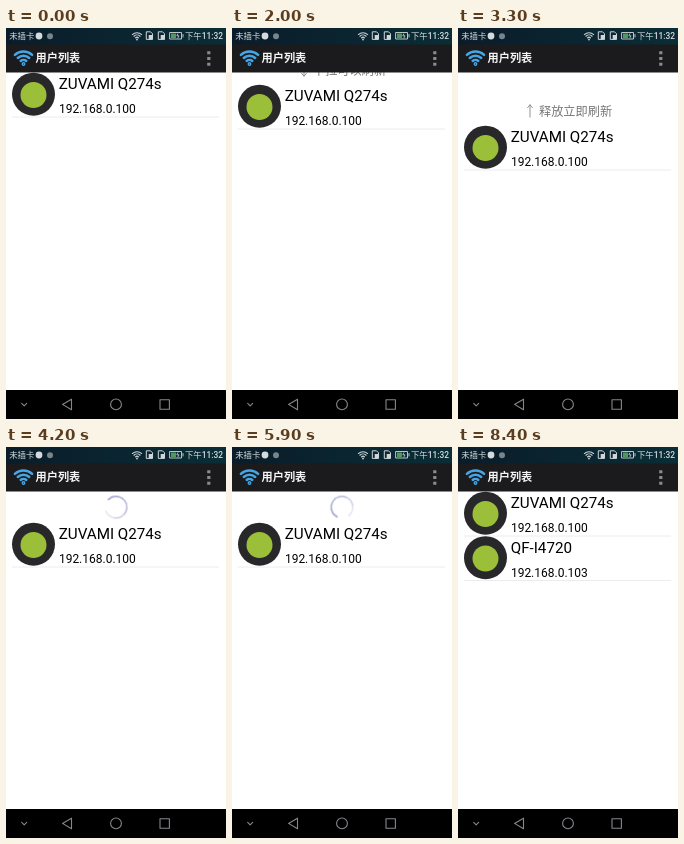
An HTML page for the animation above (9700 ms loop, 220 px wide and 391 px high).

```html
<!DOCTYPE html>
<html lang="zh-CN">
<head>
<meta charset="utf-8">
<title>用户列表</title>
<style>
html, body { margin: 0; width: 100%; height: 100%; overflow: hidden; background: #fff; }
svg { display: block; width: 100vw; height: 100vh; }
text { font-family: Roboto, "Noto Sans CJK SC", "Noto Sans CJK", sans-serif; }
.name { font-size: 15.2px; }
.ip { font-size: 12px; }
.hint { font-size: 12.2px; fill: #777; }
.status { font-size: 8.4px; font-weight: 500; fill: #d5dde0; }
.title { font-size: 11.2px; font-weight: 700; fill: #f4f4f4; }
.line { fill: none; stroke-linecap: round; stroke-linejoin: round; }

/* One loop is 9.7 s, so 100 ms is about 1.031 % */
.list, .hints, .pull, .release, .arrow, .spinner, .second { animation: 9.7s step-end infinite; }
.list { animation-name: drag; }
.hints { animation-name: hints; }
.pull { animation-name: pull; }
.release { animation-name: release; }
.arrow { animation-name: flip; transform-origin: 72px 30px; }
.spinner { animation-name: busy; }
.second { animation-name: found; }
.ring { transform-origin: 110px 29.2px; animation: spin 1s steps(10) infinite; }

@keyframes drag {
  0% { transform: translateY(0); }
  16.49% { transform: translateY(0); animation-timing-function: steps(9); }
  25.77% { transform: translateY(27px); animation-timing-function: steps(8); }
  34.02% { transform: translateY(53px); }
  39.17% { transform: translateY(47px); }
  41.23% { transform: translateY(33px); }
  42.26% { transform: translateY(31px); }
  61.85% { transform: translateY(18px); }
  62.88% { transform: translateY(6px); }
  63.91%, 100% { transform: translateY(0); }
}
@keyframes hints {
  0% { opacity: 1; }
  39.17% { opacity: 0; }
  61.85%, 100% { opacity: 1; }
}
@keyframes pull {
  0% { opacity: 1; }
  26.8% { opacity: 0; }
  61.85%, 100% { opacity: 1; }
}
@keyframes release {
  0% { opacity: 0; }
  26.8% { opacity: 1; }
  61.85%, 100% { opacity: 0; }
}
@keyframes flip {
  0% { transform: rotate(0); }
  26.8% { transform: rotate(-90deg); }
  27.83% { transform: rotate(-180deg); }
  61.85%, 100% { transform: rotate(0); }
}
@keyframes busy {
  0% { opacity: 0; }
  39.17% { opacity: 1; }
  61.85%, 100% { opacity: 0; }
}
@keyframes found {
  0% { opacity: 0; }
  61.85%, 100% { opacity: 1; }
}
@keyframes spin { to { transform: rotate(360deg); } }
</style>
</head>
<body>
<svg viewBox="0 0 220 391">
  <defs>
    <linearGradient id="sky">
      <stop offset="0" stop-color="#0a1c2a"/>
      <stop offset="1" stop-color="#0a2d36"/>
    </linearGradient>
    <g id="avatar">
      <circle cx="27.5" cy="66.2" r="21.5" fill="#28282a"/>
      <circle cx="27.5" cy="67" r="13" fill="#9cbf3a"/>
    </g>
    <path id="divider" d="M6 89H213" stroke="#e6e8ea" stroke-width=".8"/>
    <g id="wifi" class="line">
      <path d="M-8.6-9.2A12.6 12.6 0 0 1 8.6-9.2M-5.7-6A8.3 8.3 0 0 1 5.7-6M-2.8-3A4.1 4.1 0 0 1 2.8-3"/>
      <circle r=".7"/>
    </g>
    <g id="sim">
      <path class="line" d="M-2.8-4H1L3-2V3.6H-2.8Z" stroke="#cfd6da" stroke-width="1"/>
      <path d="M-.8-.8H3V3.6H-.8Z" fill="#cfd6da"/>
    </g>
    <circle id="arc" cx="110" cy="29.2" r="10.8" pathLength="360" transform="rotate(150 110 29.2)"/>
  </defs>

  <rect width="220" height="391" fill="#fff"/>

  <g class="list">
    <g class="hints">
      <path class="line arrow" d="M72 23.8V36.2M69.6 33.4L72 36.2L74.4 33.4" stroke="#888" stroke-width=".9"/>
      <text class="hint pull" x="81" y="34.5">下拉可以刷新</text>
      <text class="hint release" x="81" y="34.5">释放立即刷新</text>
    </g>
    <g class="spinner">
      <g class="ring" fill="none" stroke="#8587bd" stroke-width="1.5" stroke-opacity=".22">
        <use href="#arc" stroke-dasharray="60 300"/>
        <use href="#arc" stroke-dasharray="120 240"/>
        <use href="#arc" stroke-dasharray="180 180"/>
        <use href="#arc" stroke-dasharray="240 120"/>
        <use href="#arc" stroke-dasharray="300 60"/>
      </g>
    </g>

    <use href="#avatar"/>
    <text class="name" x="52.7" y="61.4">ZUVAMI Q274s</text>
    <text class="ip" x="52.9" y="85.2">192.168.0.100</text>
    <use href="#divider"/>

    <g class="second">
      <g transform="translate(0 44.5)">
        <use href="#avatar"/>
        <text class="name" x="52.7" y="61.4">QF-I4720</text>
        <text class="ip" x="52.9" y="85.2">192.168.0.103</text>
        <use href="#divider"/>
      </g>
    </g>
  </g>

  <!-- Status bar -->
  <rect width="220" height="17" fill="url(#sky)"/>
  <text class="status" x="3.2" y="11">未插卡</text>
  <circle cx="33" cy="8" r="3.4" fill="#d5dadd"/>
  <circle cx="44" cy="8.3" r="3" fill="#77858c"/>
  <use href="#wifi" transform="translate(131 11.5) scale(.54)" stroke="#cfd6da" stroke-width="2"/>
  <use href="#sim" x="143.5" y="7.8"/>
  <use href="#sim" x="155.5" y="7.8"/>
  <path class="line" d="M164 4.5H175.5V11H164ZM177 6.5V9" stroke="#cfd6da" stroke-width=".9"/>
  <path d="M165 5.5H170V10H165Z" fill="#4f9a58"/>
  <path class="line" d="M171.8 5.8L170.8 7.8H173L172 9.8" stroke="#cfd6da" stroke-width=".8"/>
  <text class="status" x="217" y="11" text-anchor="end">下午11:32</text>

  <!-- Title bar -->
  <rect y="16.5" width="220" height="28" fill="#1b1b1e"/>
  <use href="#wifi" x="17.5" y="36" stroke="#46a5e4" stroke-width="2.5"/>
  <text class="title" x="29.5" y="34.4">用户列表</text>
  <path d="M202.8 23.3V38.3" stroke="#8b8b8e" stroke-width="3.2" stroke-dasharray="3 2.7"/>

  <!-- Navigation bar -->
  <rect y="362" width="220" height="29" fill="#000"/>
  <g class="line" stroke="#85878a" stroke-width="1.1">
    <path d="M15.7 375.3L18.2 377.8L20.7 375.3"/>
    <path d="M65.5 371.2V381.7L56.5 376.4Z"/>
    <circle cx="110" cy="376.4" r="5.4"/>
    <path d="M154 371.8H163.4V381.2H154Z"/>
  </g>
</svg>
</body>
</html>
```
